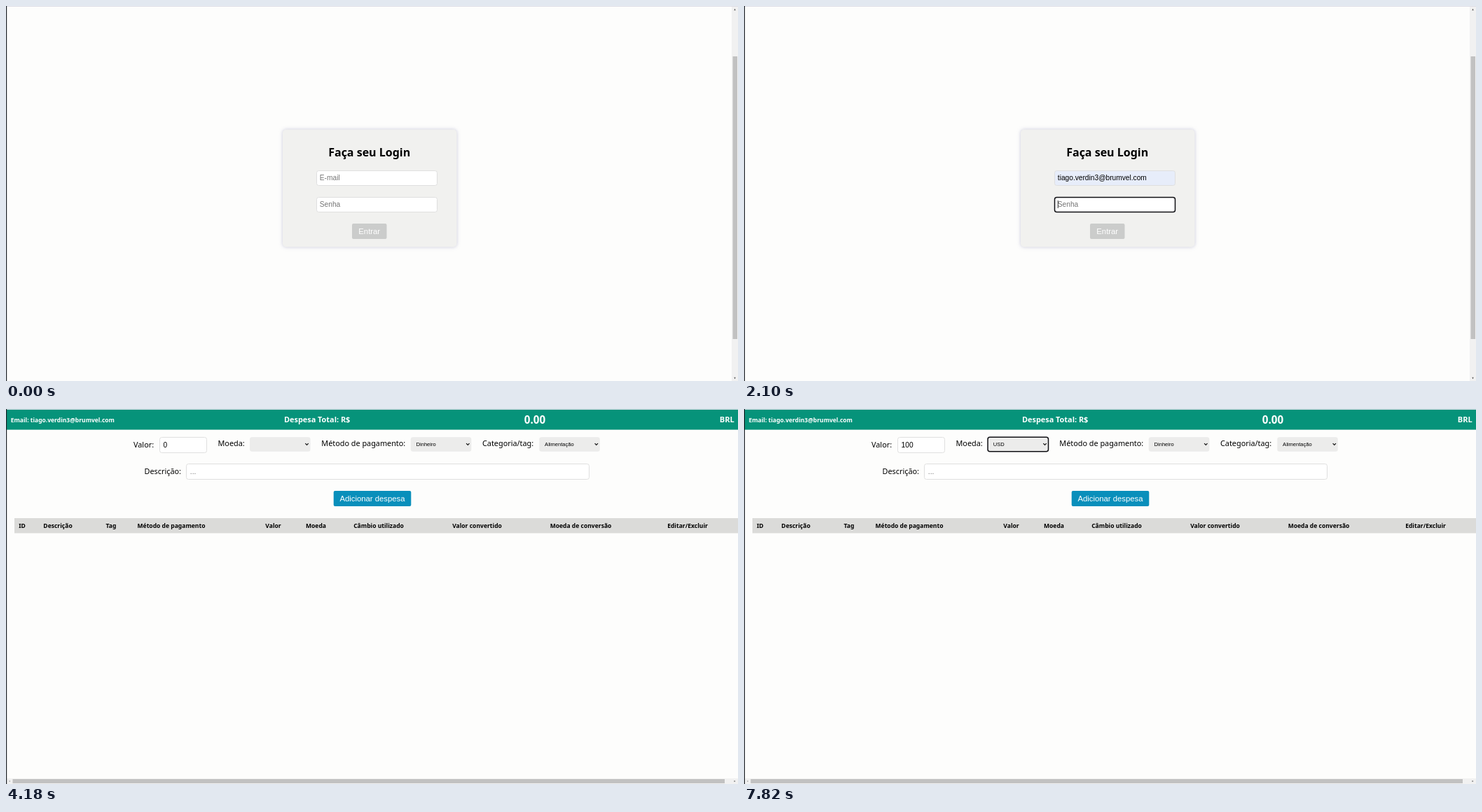
These frames come from a looping animation (1045 by 536 pixels, 8000 ms). An HTML page with a canvas:

```html
<!DOCTYPE html>
<html lang="pt">
<head>
<meta charset="utf-8">
<title>Despesas</title>
<style>
html, body { margin: 0; width: 100%; height: 100%; overflow: hidden; background: #fdfdfc }
canvas { display: block }
</style>
</head>
<body>
<canvas id="stage" width="1045" height="536"></canvas>
<script>
const c = document.getElementById('stage').getContext('2d');
const LOOP = 8000;
const UI = '"Noto Sans", "Open Sans", sans-serif';
const FORM = '"Liberation Sans", Arial, sans-serif';
const GREEN = [6, 147, 122], GREY = [203, 204, 203];
const USER = 'tiago.verdin3', HOST = '@brumvel.com', EMAIL = USER + HOST;
const SUGGESTIONS = [EMAIL, 'd' + HOST, 'e@v.com', 'ddorvenga' + HOST, EMAIL + 'dde', EMAIL + 'd'];
const COLUMNS = [['ID', 23], ['Descrição', 74], ['Tag', 150], ['Método de pagamento', 236],
  ['Valor', 381.5], ['Moeda', 442.5], ['Câmbio utilizado', 532], ['Valor convertido', 672.5],
  ['Moeda de conversão', 820.5], ['Editar/Excluir', 973]];

const rgb = a => `rgb(${a.join()})`;
const mix = (a, b, k) => rgb(a.map((v, i) => Math.round(v + (b[i] - v) * k)));
const clamp = v => Math.max(0, Math.min(1, v));
const smooth = k => k * k * (3 - 2 * k);

function rect(x, y, w, h, color) {
  c.fillStyle = color;
  c.fillRect(x, y, w, h);
}

function box(x, y, w, h, r, fill, stroke, line = 1) {
  c.beginPath();
  c.roundRect(x, y, w, h, r);
  c.fillStyle = fill;
  c.fill();
  if (!stroke) return;
  c.shadowColor = 'transparent';
  c.strokeStyle = stroke;
  c.lineWidth = line;
  c.stroke();
}

function text(str, x, y, size, { color = '#000', font = UI, bold = false, align = 'left' } = {}) {
  c.font = `${bold ? 'bold ' : ''}${size}px ${font}`;
  c.fillStyle = color;
  c.textAlign = align;
  c.fillText(str, x, y);
}

const formText = (str, x, y, size = 10.2, color = '#000', align) =>
  text(str, x, y, size, { color, font: FORM, align });

function shadow(color, blur, draw, dy = 0) {
  c.save();
  c.shadowColor = color;
  c.shadowBlur = blur;
  c.shadowOffsetY = dy;
  draw();
  c.restore();
}

function input(x, y, w, h, focus, fill = '#fff') {
  box(x, y, w, h, 3, fill, focus ? '#101014' : '#dfdfdf', focus ? 1.5 : 1);
}

const caret = (x, y) => rect(x, y, 0.8, 11, '#000');

function triangle(x, y, dx, dy, color = '#505050') {
  c.beginPath();
  c.moveTo(x + dx, y + dy);
  c.lineTo(x - dx + dy, y - dy + dx);
  c.lineTo(x - dx - dy, y - dy - dx);
  c.fillStyle = color;
  c.fill();
}

function dropdown(t) {
  if (t < 770 || t >= 1800) return;
  const shown = clamp(1 - (t - 1590) / 200), scale = 1 - 0.042 * (1 - shown);
  c.save();
  c.globalAlpha = shown;
  c.translate(573.3, 325.2);
  c.scale(scale, scale);
  c.translate(-573.3, -325.2);
  shadow('rgba(0,0,0,.28)', 3, () => box(498.5, 262.5, 149.5, 126, 2, '#fafafa'), 1);
  triangle(508, 261, 0, -2, '#fafafa');
  if (t >= 1080) rect(498.5, 264, 149.5, 20, '#dadada');
  SUGGESTIONS.forEach((s, i) => text(s, 505.5, 277.2 + i * 20.35, 8.5, { color: '#333' }));
  c.restore();
}

function login(t) {
  rect(1036, 1, 9, 535, '#f1f1f1');
  rect(1037.5, 72, 6.5, 404, '#c1c1c1');
  triangle(1040.5, 5, 0, -1.2);
  triangle(1040.5, 532, 0, 1.2);

  shadow('rgba(150,150,190,.5)', 5, () => box(395, 176.5, 248.5, 168, 5, '#f1f1ef'));
  text('Faça seu Login', 518.7, 214.5, 16, { bold: true, align: 'center' });

  const filled = t >= 1600, preview = t >= 1080 && !filled;
  const onEmail = t >= 480 && t < 2100, onPassword = t >= 2100 && t < 3900;
  input(443.5, 235.5, 172, 21, onEmail, filled || preview ? '#e7edfa' : '#fff');
  if (filled) formText(EMAIL, 447.8, 249);
  else if (preview) formText(EMAIL, 447.8, 249, 7.55);
  else formText('E-mail', 447.8, 249, 10.2, '#757575');
  if (onEmail && !preview) caret(filled ? 575.3 : 447.6, 240);

  const dots = t < 2650 ? 0 : Math.min(7, 1 + Math.floor((t - 2650) / 48));
  input(443.5, 273.5, 172, 21, onPassword);
  if (dots) formText('•'.repeat(dots), 447.8, 287);
  else formText('Senha', 447.8, 287, 10.2, '#757575');
  if (onPassword && t < 3720) caret(447.8 + dots * 3.57, 278);

  const enabled = smooth(clamp((t - 2900) / 250));
  box(494, 311, 49.5, 22, 2, mix(GREY, GREEN, enabled));
  formText('Entrar', 518.7, 326, 11.3, '#fff', 'center');
  dropdown(t);
}

function select(x, value, focus) {
  box(x, 40.3, 86.5, 20.4, 3, '#ececeb', focus && '#101014', 1.5);
  formText(value, x + 7.8, 53, 7.55);
  c.beginPath();
  c.moveTo(x + 79.3, 49.2);
  c.lineTo(x + 81.5, 51.5);
  c.lineTo(x + 83.7, 49.2);
  c.strokeStyle = '#111';
  c.lineWidth = 1.2;
  c.stroke();
}

function valueField(t) {
  const focus = t >= 5770 && t < 7820;
  const value = t < 6750 ? '0' : t < 6830 ? '1' : t < 6980 ? '10' : '100';
  const selected = t >= 5870 && t < 6750;
  input(219.5, 40.5, 67, 22, focus);
  if (selected) rect(224.5, 45, 6, 12, '#3584e4');
  formText(value, 224.6, 54.7, 10.2, selected ? '#fff' : '#000');
  if (focus && !selected && t < 7580) caret(224.6 + value.length * 5.67, 46);
  if (t >= 5270 && t < 7820) {
    rect(273, 46, 8, 11, '#efefef');
    triangle(277, 48.7, 0, -1);
    triangle(277, 54, 0, 1);
  }
}

function expenses(t) {
  const white = { color: '#fff', bold: true };
  rect(1, 1, 1044, 28.6, rgb(GREEN));
  text('Email: ' + EMAIL, 6.7, 18.5, 8.5, white);
  text('Despesa Total: R$', 397, 19.3, 10.9, white);
  text('0.00', 739.7, 20.8, 15.2, white);
  text('BRL', 1039.7, 19.3, 11, { ...white, align: 'right' });

  for (const [label, x, y] of [['Valor:', 182, 54.7], ['Moeda:', 302.5, 53],
    ['Método de pagamento:', 450.3, 53], ['Categoria/tag:', 680, 53], ['Descrição:', 197.5, 92.7]])
    text(label, x, y, 10.85);
  valueField(t);
  select(348, t < 4380 ? '' : 'USD', t >= 7820);
  select(577.8, 'Dinheiro');
  select(761.3, 'Alimentação');
  input(257.5, 78.5, 575, 22);
  formText('...', 262.8, 93, 10.2, '#757575');
  box(467.7, 117, 110.6, 22, 2, '#098fbb');
  formText('Adicionar despesa', 523, 131.8, 11.3, '#fff', 'center');

  rect(12, 156, 1033, 21.5, '#dbdbd9');
  for (const [name, x] of COLUMNS) text(name, x, 170, 8.55, { bold: true, align: 'center' });

  rect(1, 528, 1044, 8, '#f1f1f1');
  rect(9.5, 529, 1016.5, 6, '#c1c1c1');
  triangle(5, 532, -1, 0, '#a0a0a0');
  triangle(1040.5, 532, 1, 0);
}

function frame(now) {
  const t = now % LOOP;
  rect(0, 0, 1045, 536, '#fdfdfc');
  (t < 4180 ? login : expenses)(t);
  rect(0, 0, 1045, 0.8, '#d6d6e2');
  rect(0, 0, 1.2, 536, '#20242a');
  requestAnimationFrame(frame);
}
requestAnimationFrame(frame);
</script>
</body>
</html>
```
